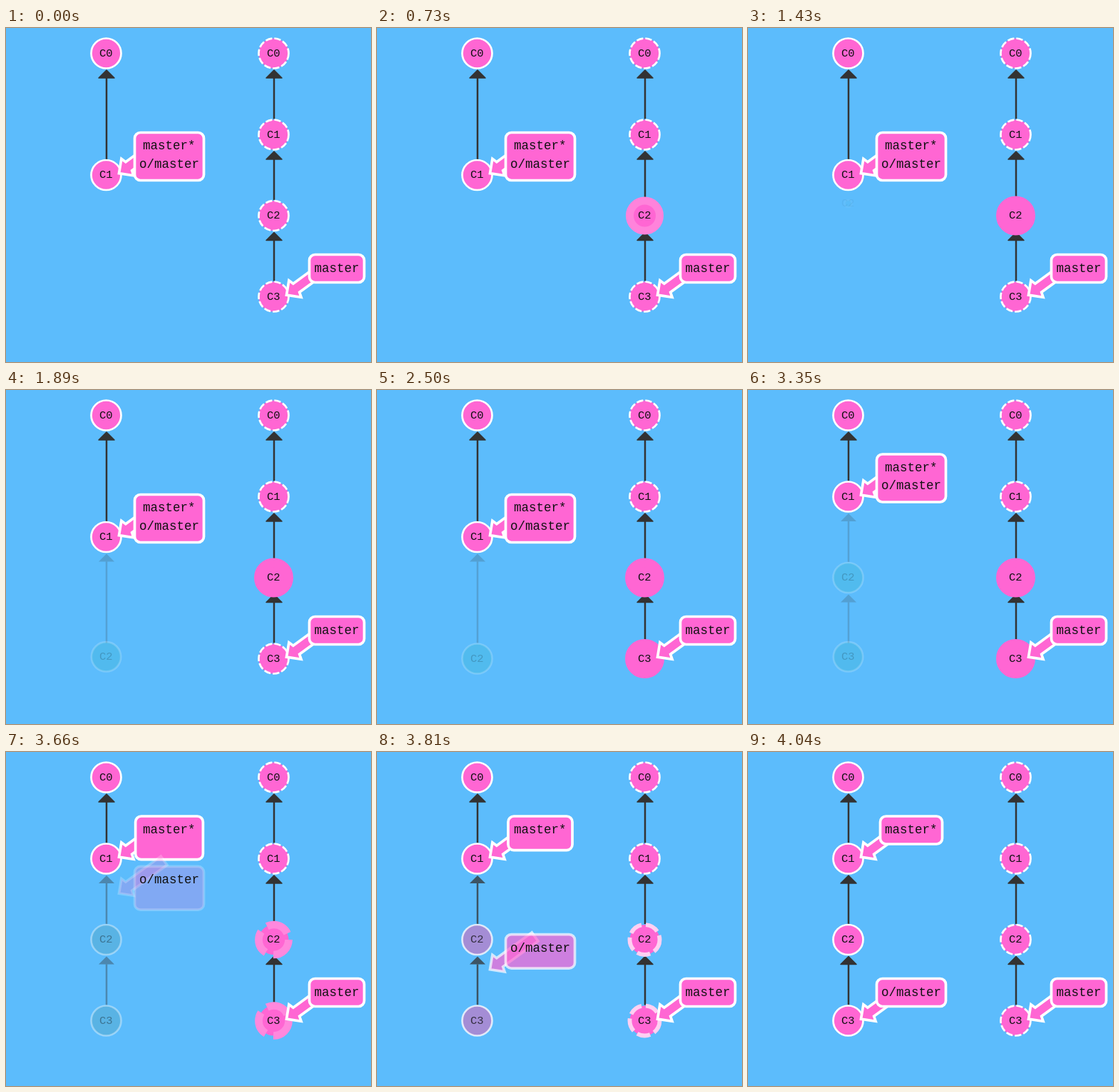
Recreate the animation shown at these times as an HTML page with a canvas. Size 512x468 px, loop 5360 ms.

```html
<!DOCTYPE html>
<html lang="en">
<head>
<meta charset="utf-8">
<title>Fetching commits</title>
<style>
html, body { margin: 0; width: 100%; height: 100%; overflow: hidden; background: #5cbcfc; }
canvas { display: block; }
</style>
</head>
<body>
<canvas id="stage" width="512" height="468"></canvas>
<script>
const ctx = document.getElementById('stage').getContext('2d');
const LOOP = 5360, R = 21, THIN = 2.7, THICK = 13;
const LEFT = 140.5, RIGHT = 375.5;
const TEAL = [36, 179, 179], PINK = [255, 102, 211], WHITE = [255, 255, 255];
const PINK_FILL = `rgb(${PINK})`;
const MONO = '"Liberation Mono", "Courier New", monospace';

const mix = (a, b, k) => a + (b - a) * k;
const blend = (a, b, k) => `rgb(${a.map((v, i) => Math.round(mix(v, b[i], k)))})`;
const part = (t, start, length) => Math.min(1, Math.max(0, (t - start) / length));
const ease = p => p * p * (3 - 2 * p);

function bounce(p) {
  const s = 7.5625, l = 2.75;
  if (p < 1 / l) return s * p * p;
  if (p < 2 / l) return s * (p - 1.5 / l) ** 2 + 0.75;
  if (p < 2.5 / l) return s * (p - 2.25 / l) ** 2 + 0.9375;
  return s * (p - 2.625 / l) ** 2 + 0.984375;
}

function text(str, x, y, size) {
  ctx.font = `${size}px ${MONO}`;
  ctx.textAlign = 'center';
  ctx.fillStyle = '#111';
  ctx.fillText(str, x, y);
}

function edge(x, parentY, childY, alpha = 1) {
  const top = parentY + 23, end = childY - 22;
  if (alpha <= 0 || end < top) return;
  ctx.globalAlpha = alpha;
  ctx.fillStyle = ctx.strokeStyle = '#333';
  ctx.lineJoin = 'round';
  ctx.lineWidth = 2.5;
  ctx.beginPath();
  ctx.moveTo(x + 0.5, Math.min(top + 11.5, end));
  ctx.lineTo(x + 0.5, end);
  ctx.stroke();
  ctx.lineWidth = 1.5;
  ctx.beginPath();
  ctx.moveTo(x + 0.5, top + 0.5);
  ctx.lineTo(x + 11.5, top + 11.5);
  ctx.lineTo(x - 10.5, top + 11.5);
  ctx.closePath();
  ctx.fill();
  if (alpha === 1) ctx.stroke();
  ctx.globalAlpha = 1;
}

function node(name, x, y, o = {}) {
  const { alpha = 1, r = R, fill = PINK_FILL, pulse = 0, dashed = false } = o;
  if (alpha <= 0) return;
  const width = mix(THIN, THICK, pulse), gap = width + 0.4;
  ctx.globalAlpha = alpha;
  ctx.beginPath();
  ctx.arc(x, y, r, 0, Math.PI * 2);
  ctx.fillStyle = fill;
  ctx.fill();
  ctx.setLineDash(dashed ? [3 * gap, gap] : []);
  ctx.lineWidth = width;
  ctx.strokeStyle = blend(WHITE, PINK, pulse);
  ctx.stroke();
  ctx.setLineDash([]);
  text(name, x - 0.3, y + 4, 15.5);
  ctx.globalAlpha = 1;
}

// Branch flag: an arrow at the commit (x, y) behind a rounded box
function flag(x, y, left, right, top, height, alpha = 1) {
  if (alpha <= 0) return;
  ctx.globalAlpha = alpha;
  ctx.fillStyle = PINK_FILL;
  ctx.strokeStyle = '#fff';
  ctx.lineWidth = 3.7;
  ctx.lineJoin = 'miter';
  ctx.save();
  ctx.translate(x + 18, y - 2.3);
  ctx.rotate(-Math.PI / 5);
  ctx.beginPath();
  for (const [px, py] of [[78, -7.5], [17, -7.5], [14.8, -14.6], [0, 0], [14.8, 14.6], [17, 7.5], [78, 7.5]])
    ctx.lineTo(px, py);
  ctx.closePath();
  ctx.fill();
  ctx.stroke();
  ctx.restore();
  ctx.beginPath();
  ctx.roundRect(left, top, right - left, height, 8);
  ctx.fill();
  ctx.stroke();
  ctx.globalAlpha = 1;
}

function drawLocal(t, done) {
  const birth2 = bounce(part(t, 1327, 590)), birth3 = bounce(part(t, 2787, 590));
  const grow2 = ease(part(t, 1327, 400)), grow3 = ease(part(t, 2787, 400));
  const shift = ease(part(t, 2760, 390));
  const y0 = 35.5, y1 = mix(206, 149.5, shift);
  const y2 = mix(mix(206, 376.5, birth2), 263, shift);
  const y3 = mix(206, 376.5, birth3);
  const solid = mix(0.2, 1, done), fill = blend(TEAL, PINK, done);

  edge(LEFT, y0, y1);
  edge(LEFT, y1, mix(mix(206, 376.5, grow2), 263, shift), solid * grow2);
  edge(LEFT, y2, mix(206, 376.5, grow3), solid * grow3);
  node('C3', LEFT, y3, { alpha: solid * birth3, r: R * birth3, fill });
  node('C2', LEFT, y2, { alpha: solid * birth2, r: R * birth2, fill });
  node('C1', LEFT, y1);
  node('C0', LEFT, y0);

  // The second name starts one line below the first and takes its own box along
  const remoteY = mix(y1, 376.5, done), remoteTop = remoteY - mix(34.5, 59, done);
  const height = mix(67, 39, done);
  flag(LEFT, y1, mix(180.5, 185.5, done), mix(277.5, 272.5, done), y1 - 59.5, height);
  flag(LEFT, remoteY, 180.5, 277.5, remoteTop, height, done);
  text('master*', 228.7, y1 - 36, 17.5);
  text('o/master', 229, remoteTop + 24, 17.5);
}

function drawRemote(t, done) {
  const ys = [35.5, 149.5, 263, 376.5];
  const starts = [Infinity, Infinity, 400, 2030];
  for (let i = 1; i < 4; i++) edge(RIGHT, ys[i - 1], ys[i]);
  ys.forEach((y, i) => {
    const pulse = ease(part(t, starts[i], 460)) * (1 - done);
    node('C' + i, RIGHT, y, { pulse, dashed: t < starts[i] || done > 0 });
  });
  flag(RIGHT, ys[3], 425.5, 502.5, 317.5, 39);
  text('master', 464, 341.5, 17.5);
}

const origin = performance.now();
function draw(now) {
  const t = Math.max(0, now - origin) % LOOP;
  const done = ease(part(t, 3520, 460));
  ctx.fillStyle = '#5cbcfc';
  ctx.fillRect(0, 0, 512, 468);
  drawLocal(t, done);
  drawRemote(t, done);
  requestAnimationFrame(draw);
}
draw(origin);
</script>
</body>
</html>
```
